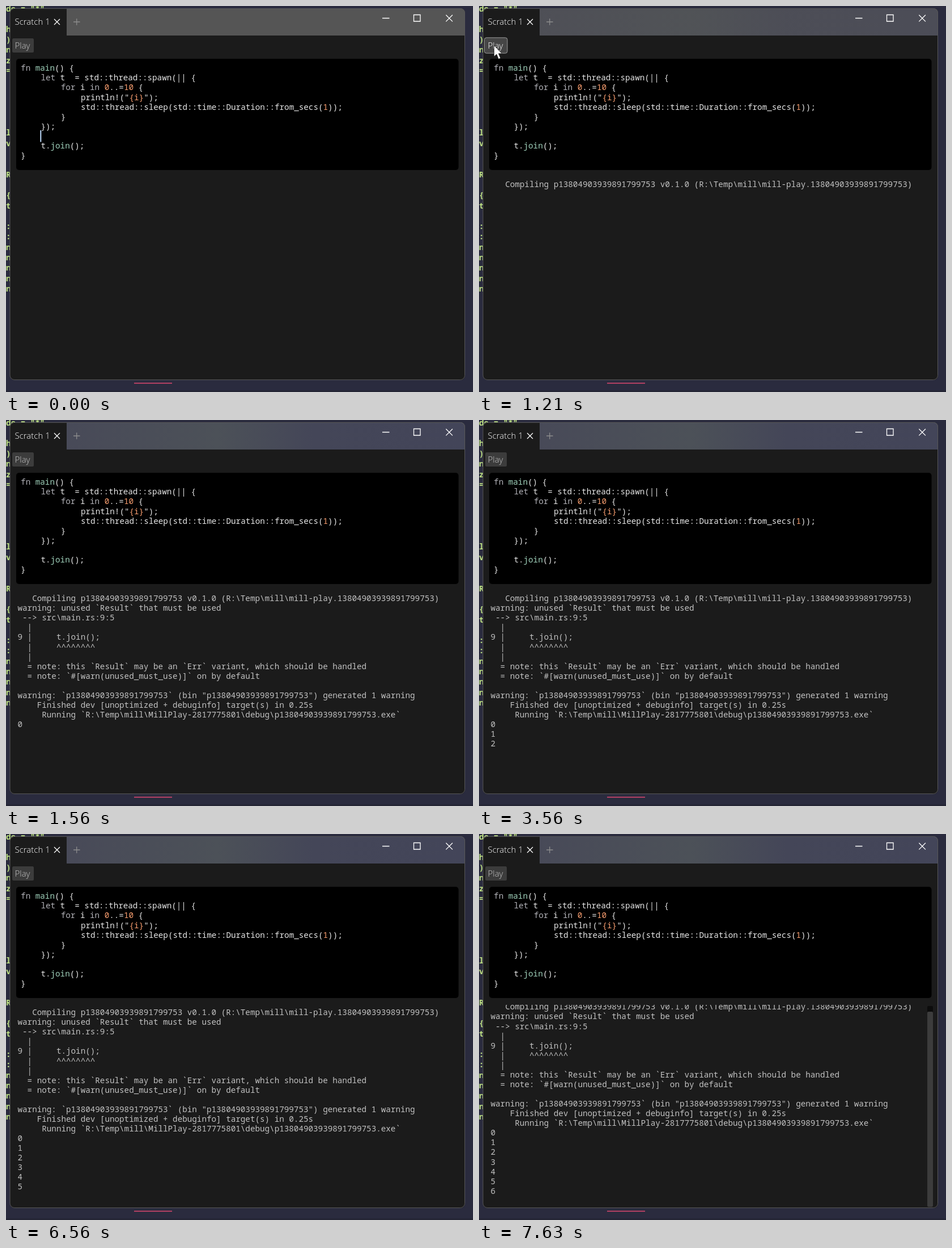
Animation of 824 by 680 pixels, one loop 8000 ms. Source, as an HTML page:

```html
<!DOCTYPE html>
<html lang="en">
<head>
<meta charset="utf-8">
<title>Scratch</title>
<style>
  html, body { margin: 0; width: 100%; height: 100%; overflow: hidden; background: #2a2b3e; }
  svg { display: block; width: 100%; height: 100%; }
  text { white-space: pre; }
  .ui { font: 300 15px "Open Sans", "Noto Sans", sans-serif; }
  .mono { font: 14.25px "Noto Sans Mono", monospace; }
  .back { font-weight: 600; fill: #bfe283; }
  .line { fill: none; stroke: #fff; stroke-width: 1.3; }
  #code { fill: #e6e6e6; }
  #output { fill: #c2c2c2; }
  .keyword { fill: #b2b2b8; }
  .name { fill: #9fd0ba; }
  .value { fill: #fa9f70; }
</style>
</head>
<body>
<svg viewBox="0 0 824 680">
  <defs>
    <linearGradient id="mica">
      <stop offset="0" stop-color="#484a58"/>
      <stop offset=".38" stop-color="#4c5158"/>
      <stop offset=".62" stop-color="#444658"/>
      <stop offset="1" stop-color="#434559"/>
    </linearGradient>
    <clipPath id="frame"><rect x="7" y="4" width="803" height="655" rx="8"/></clipPath>
    <clipPath id="pane"><rect x="12" y="301" width="790" height="356"/></clipPath>
  </defs>

  <rect width="824" height="680" fill="#2a2b3e"/>
  <rect y="677" width="824" height="3" fill="#242535"/>
  <g id="backdrop"></g>
  <path d="M226 664.5H293" stroke="#e2486f" stroke-width="1.6"/>

  <g clip-path="url(#frame)">
    <rect x="7" y="4" width="803" height="655" fill="#1b1b1b"/>
    <rect x="107" y="4" width="703" height="48" fill="#555"/>
    <rect id="tint" x="107" y="4" width="703" height="48" fill="url(#mica)"/>
  </g>
  <rect x="7" y="4.5" width="802.5" height="654" rx="8" fill="none" stroke="#585858"/>

  <text class="ui" x="15.5" y="33" fill="#fff">Scratch 1</text>
  <path class="line" d="M85 23l10 10m0-10l-10 10"/>
  <path class="line" d="M119 28h11.5M124.7 22.3v11.5" style="stroke:#8d8d8d"/>
  <path class="line" d="M664 21.5h12.5M719.5 15.5h11.5v11.5h-11.5zM776.3 15.8l11.6 11.6m0-11.6l-11.6 11.6"/>

  <rect id="button"/>
  <text id="label" class="ui" x="15.5" y="74.5">Play</text>

  <rect x="18" y="93" width="780.5" height="196" rx="5"/>
  <g id="code" class="mono"></g>
  <path id="caret" d="M61.3 219V239.5" stroke="#c0deff" stroke-width="2"/>

  <g clip-path="url(#pane)"><g id="output" class="mono"></g></g>
  <g id="scrollbar">
    <rect x="791" y="303" width="10" height="354" rx="2" fill="#0c0c0c"/>
    <rect x="791" y="313" width="10" height="344" rx="2" fill="#3c3c3c"/>
  </g>

  <path id="pointer" d="M0 0V19.5L4.5 15.5L8 24L11.5 22.5L8 14.3H14Z" fill="#fff" stroke="#222" stroke-width=".8"/>
</svg>

<script>
const LOOP = 8000, LINE_HEIGHT = 17.07;
const $ = id => document.getElementById(id);

function addText(parent, x, y, content, className = '') {
  const node = document.createElementNS('http://www.w3.org/2000/svg', 'text');
  node.setAttribute('x', x);
  node.setAttribute('y', y);
  node.setAttribute('class', className);
  node.innerHTML = content;
  parent.append(node);
  return node;
}

function setAttributes(node, attributes) {
  for (const key in attributes) node.setAttribute(key, attributes[key]);
}

// Fragments of the editor behind the window
const fragments = [['de = "*"', 5], ['h', 41], [')', 59], ['n', 77], ['z', 96], ['=', 114],
  ['l', 223], ['v', 242], ['R', 297], ['{', 333], ['t', 352], [':', 388], [':', 406],
  ['n', 425], ['n', 443], ['n', 461], ['n', 480], ['n', 498]];
for (const [content, y] of fragments) addText($('backdrop'), 0, y + 4.7, content, 'mono back');

// Source code: indent level and text of each line
const highlight = line => line
  .replace(/\b(fn|let|for|in)\b|\b(main|join)\b|(\{i\}|\d+)/g, (word, keyword, name) =>
    `<tspan class="${keyword ? 'keyword' : name ? 'name' : 'value'}">${word}</tspan>`);
const program = [
  [0, 'fn main() {'],
  [1, 'let t  = std::thread::spawn(|| {'],
  [2, 'for i in 0..=10 {'],
  [3, 'println!("{i}");'],
  [3, 'std::thread::sleep(std::time::Duration::from_secs(1));'],
  [2, '}'],
  [1, '});'],
  [0, ''],
  [1, 't.join();'],
  [0, '}']
];
program.forEach(([indent, line], i) =>
  addText($('code'), 26.1 + indent * 35.3, 114.3 + i * LINE_HEIGHT, highlight(line)));

// Build log followed by the counter
const id = 'p13804903939891799753';
const log = [
  `   Compiling ${id} v0.1.0 (R:\\Temp\\mill\\mill-play.${id.slice(1)})`,
  'warning: unused `Result` that must be used',
  ' --&gt; src\\main.rs:9:5',
  '  |',
  '9 |     t.join();',
  '  |     ^^^^^^^^',
  '  |',
  '  = note: this `Result` may be an `Err` variant, which should be handled',
  '  = note: `#[warn(unused_must_use)]` on by default',
  '',
  'warning: `' + id + '` (bin "' + id + '") generated 1 warning',
  '    Finished dev [unoptimized + debuginfo] target(s) in 0.25s',
  '     Running `R:\\Temp\\mill\\MillPlay-2817775801\\debug\\' + id + '.exe`',
  0, 1, 2, 3, 4, 5, 6
];
const logLines = log.map((line, i) =>
  addText($('output'), 20.5, 319.2 + i * LINE_HEIGHT, line));

const buildSteps = [[1210, 1], [1280, 2], [1350, 5], [1420, 11], [1490, 13]];

function visibleLines(t) {
  if (t >= 1550) return 14 + Math.floor((t - 1550) / 1000);
  return buildSteps.reduce((count, [start, lines]) => t >= start ? lines : count, 0);
}

function pointerPosition(t) {
  const step = Math.min(6, Math.floor((t - 190) / 80));
  const u = 1 - (1 - step / 6) ** 2;
  const bezier = (a, b, c) => (1 - u) ** 2 * a + 2 * u * (1 - u) * b + u * u * c;
  return [bezier(0, 114, 26.5), bezier(655, 330, 69.5)];
}

const show = (node, visible) => node.setAttribute('visibility', visible ? 'visible' : 'hidden');
const idle = { x: 11, y: 57, width: 38, height: 25, rx: 2.5, fill: '#3c3c3c', stroke: 'none' };
const hovered = { x: 9.5, y: 55.8, width: 40.5, height: 27.4, rx: 3.5, fill: '#464646', stroke: '#999' };
const pressed = { ...hovered, fill: '#373737', stroke: '#fff' };

function draw(t) {
  const [x, y] = pointerPosition(t);
  const pointerShown = t >= 190 && t < 1560;
  const over = pointerShown && x > 9 && x < 50 && y > 55 && y < 83;
  const down = t >= 1070 && t < 1140;

  show($('pointer'), pointerShown);
  $('pointer').setAttribute('transform', `translate(${x} ${y})`);
  setAttributes($('button'), down ? pressed : over ? hovered : idle);
  $('label').setAttribute('fill', over ? '#fff' : '#c8c8c8');

  show($('caret'), t < 1140);
  $('tint').setAttribute('opacity', Math.max(0, Math.min(1, (t - 1100) / 220)));

  const count = visibleLines(t);
  logLines.forEach((line, i) => show(line, i < count));
  const scrolled = t >= 7630;
  $('output').setAttribute('transform', `translate(0 ${scrolled ? -9.8 : 0})`);
  show($('scrollbar'), scrolled);
}

const start = performance.now();
function tick() {
  draw((performance.now() - start) % LOOP);
  requestAnimationFrame(tick);
}
tick();
</script>
</body>
</html>
```
